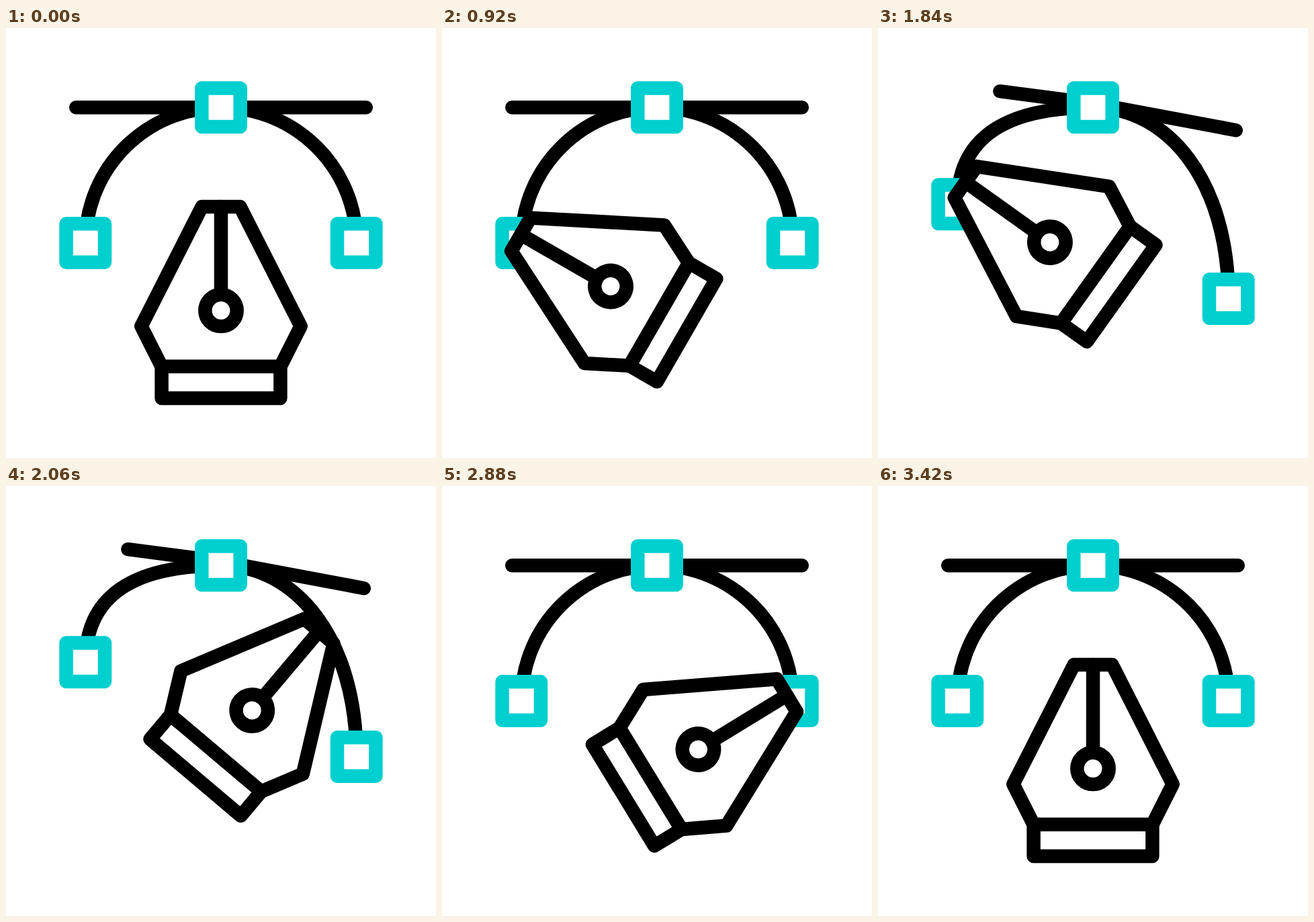
These frames come from a looping animation (640 px wide and 640 px high, 3600 ms). An HTML page:

```html
<!DOCTYPE html>
<html lang="en">
<head>
<meta charset="utf-8">
<title>Pen tool</title>
<style>
  html, body { margin: 0; width: 100%; height: 100%; overflow: hidden; background: #fff; }
  svg { display: block; width: 100vw; height: 100vh; }
  .ink, .node { stroke-width: 20.5; stroke-linecap: round; stroke-linejoin: round; }
  .ink { stroke: #000; fill: none; }
  .node { stroke: #00cfcf; fill: #fff; }
  #pen { fill: #fff; }
</style>
</head>
<body>
<svg viewBox="0 0 640 640">
  <path id="handle" class="ink"/>
  <path id="curve" class="ink"/>
  <rect class="node" x="291.3" y="89.5" width="57.4" height="57.4"/>
  <rect id="left" class="node" x="89.6" width="57.4" height="57.4"/>
  <rect id="right" class="node" x="493" width="57.4" height="57.4"/>
  <!-- the pen's own origin is the centre of its hole -->
  <g id="pen" class="ink">
    <path d="M-88.4 83.4V130.6H88.4V83.4Z"/>
    <path d="M-28.5-154.3H28.5L118.7 23.5L88.4 83.4H-88.4L-118.7 23.5Z"/>
    <path d="M0-154.3V-24"/>
    <circle r="23.7"/>
  </g>
</svg>
<script>
const LOOP = 3600, STEP = 20;
const el = id => document.getElementById(id);
const [handle, curve, left, right, pen] = ['handle', 'curve', 'left', 'right', 'pen'].map(el);

// Pen poses: x, y, angle
const REST = [320, 420.4, 0];
const LEFT = [251, 384.5, -60];
const LEFT_UP = [252.7, 336, -60];
const RIGHT_DOWN = [374.6, 426.2, 81.4];
const RIGHT = [381.5, 392, 58.6];
const ARCH = [[276, 179], [403, 323]];

const mix = (a, b, p) => a + (b - a) * p;
const blend = (a, b, p) => a.map((v, i) => mix(v, b[i], p));
const span = (t, a, b) => Math.min(1, Math.max(0, (t - a) / (b - a)));
const smooth = x => x * x * (3 - 2 * x);

// cubic-bezier(.667, 0, .333, 1)
function ease(x) {
  let lo = 0, hi = 1;
  for (let i = 0; i < 30; i++) {
    const s = (lo + hi) / 2;
    if (s * (2 - 3 * s + 2 * s * s) < x) lo = s; else hi = s;
  }
  return smooth((lo + hi) / 2);
}

const bezier = (a, b, c, d, u) => {
  const v = 1 - u;
  return v * v * v * a + 3 * v * v * u * b + 3 * v * u * u * c + u * u * u * d;
};

function travel(u) {
  const at = i => bezier(LEFT_UP[i], ARCH[0][i], ARCH[1][i], RIGHT_DOWN[i], u);
  return [at(0), at(1), mix(LEFT_UP[2], RIGHT_DOWN[2], u)];
}

function pose(t, pull, release) {
  if (t < 900) return blend(REST, LEFT, ease(span(t, 0, 705)));
  if (t < 1790) return blend(LEFT, LEFT_UP, pull);
  if (t < 2210) return travel(smooth(span(t, 1790, 2210)));
  if (t < 2860) return blend(RIGHT_DOWN, RIGHT, release);
  return blend(RIGHT, REST, ease(span(t, 2860, 3430)));
}

function draw(t) {
  const pull = ease(span(t, 900, 1500));
  const release = ease(span(t, 2210, 2660));
  const bend = pull - release;

  // The left arm keeps its length, the right one grows as its node sinks
  const top = 118.2, arm = 111.4;
  const ly = 320 - 57.7 * bend, ry = 320 + 83 * bend;
  left.setAttribute('y', ly - 28.7);
  right.setAttribute('y', ry - 28.7);
  curve.setAttribute('d',
    `M118.3 ${ly}C118.3 ${ly - arm} ${320 - arm} ${top} 320 ${top}` +
    `C${320 + arm} ${top} 521.7 ${ry - arm - 64 * bend} 521.7 ${ry}`);
  handle.setAttribute('d',
    `M${104.2 + 77.2 * bend} ${top - 24 * bend}` +
    `L320 ${top - 6 * bend}L${535.8 - 3 * bend} ${top + 34 * bend}`);

  const [x, y, a] = pose(t, pull, release);
  pen.setAttribute('transform', `translate(${x} ${y}) rotate(${a})`);
}

const start = performance.now();
function tick() {
  const t = (performance.now() - start) % LOOP;
  draw(Math.floor(t / STEP) * STEP);
  requestAnimationFrame(tick);
}
tick();
</script>
</body>
</html>
```
